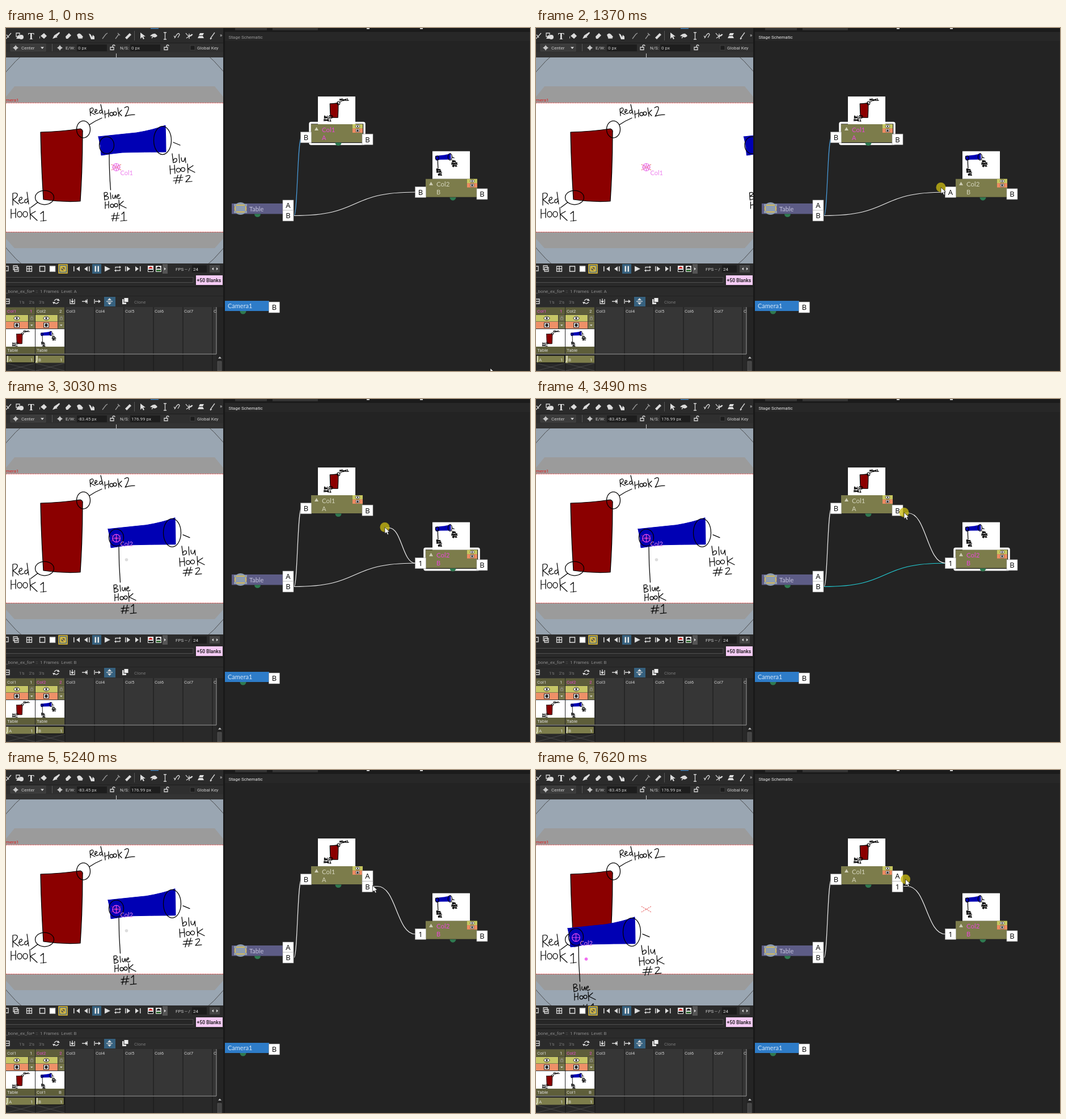
These frames come from a looping animation (924 px wide and 606 px high, 8 s). An HTML page:

```html
<!DOCTYPE html>
<html lang="en">
<head>
<meta charset="utf-8">
<title>Hook linking</title>
<style>
html, body { margin: 0; width: 100%; height: 100%; overflow: hidden; background: #232323; }
svg { display: block; width: 924px; height: 606px; }
text { font-family: Roboto, "Open Sans", sans-serif; white-space: pre; }
.node { font-family: Lato, "Open Sans", sans-serif; }
.port { font-family: "Noto Sans", sans-serif; text-anchor: middle; }
.ink { fill: none; stroke: #000; stroke-linecap: round; stroke-linejoin: round; }
.icon { fill: none; stroke: #d6d6d6; stroke-width: 1.3; }
</style>
</head>
<body>
<svg id="stage" viewBox="0 0 924 606" xmlns="http://www.w3.org/2000/svg"></svg>
<script>
const LOOP = 8000;
const PINK = '#e85ce8';

const rect = (x, y, w, h, fill, more = '') => `<rect x="${x}" y="${y}" width="${w}" height="${h}" fill="${fill}" ${more}/>`;
const path = (d, more = '') => `<path d="${d}" ${more}/>`;
const text = (x, y, s, size, fill, more = '') => `<text x="${x}" y="${y}" font-size="${size}" ${fill && `fill="${fill}"`} ${more}>${s}</text>`;
const oval = (x, y, rx, ry = rx, more = '') => `<ellipse cx="${x}" cy="${y}" rx="${rx}" ry="${ry}" ${more}/>`;
const icon = (d, more = '') => path(d, `class="icon" ${more}`);
const solid = (d, fill = '#dcdcdc') => path(d, `fill="${fill}"`);
const port = (x, y, s, id = '') => rect(x - 9.5, y - 9.5, 19, 19, '#fff', 'stroke="#999" stroke-width=".6"') +
  text(x, y + 4.8, s, 13, '#111', `class="port" ${id && `id="${id}"`}`);
const ball = (x, y) => path(`M${x - 5.5} ${y}a5.5 5.5 0 0 0 11 0z`, 'fill="#2f7a50"');

// Hand-drawn artwork; the line weight is inherited so thumbnails can reuse it.
const redArt = `<g id="redArt" class="ink">
  ${path('M61 184Q98 183 131 178Q136 180 135 184Q135 245 131 306Q100 308 66 303Q62 240 61 184Z', 'fill="#8b0000"')}
  ${oval(136.5, 179, 12, 15)}${oval(68, 299.5, 16.5, 12.5)}
  ${path('M147 171Q157 164 169 159M44 317L56 308')}
  ${path('M149 155L148 143Q154 139 154 144Q154 147 149 149L157 153M156 149Q162 147 160 144Q156 143 157 149Q159 153 163 150M169 145Q164 145 165 150Q168 152 169 148M167 135L171 152')}
  ${path('M174 146L175 159M181 144L181 157M174 153L181 150M197 141L199 156M204 145L199 150L204 155M209 141Q217 136 216 143Q213 152 210 156Q216 153 227 153')}
  ${oval(186, 152, 3)}${oval(192, 151, 3)}
  ${path('M12 313L12 292Q21 290 20 296Q18 301 12 303L22 311M22 305Q30 303 28 299Q23 298 23 306Q25 312 31 308M38 302Q32 302 33 308Q37 311 39 304M37 290L40 311')}
  ${path('M9 320L9 336M17 319L17 335M9 328L17 327M42 317L43 338M52 324L43 329L55 340M61 328L66 324L66 341M61 341L71 340')}
  ${oval(24, 329, 4, 5)}${oval(34, 329, 4, 5)}</g>`;

const blueArt = `<g id="blueArt" class="ink">
  ${path('M163 192Q200 188 230 185Q260 180 281 172Q282 195 282 219Q245 219 205 220Q185 222 168 225Q167 207 163 192Z', 'fill="#0000b4" stroke="#0000b4" stroke-width="1"')}
  ${oval(177.5, 207, 13, 15)}${oval(276, 198.5, 15.5, 25)}
  ${path('M295 202L307 207M182 223Q182 255 184.5 286')}
  ${path('M174 304L173 291Q180 289 179 294L174 297Q183 297 180 302L174 304M184 291L185 302M188 295Q187 302 191 301L193 295L194 301M195 298Q201 297 199 294Q195 294 196 300Q198 303 202 300')}
  ${path('M175 307L175 319M181 306L181 318M175 313L181 312M199 304L200 320M207 306L200 312L212 318M191 327L188 341M197 326L194 341M186 332L200 331M186 337L199 336M204 329L208 325L208 340M202 341L213 340')}
  ${oval(187, 314, 3)}${oval(194, 313, 3)}
  ${path('M293 222L295 238Q303 237 301 231Q297 229 295 234M305 223L306 238M309 229Q309 238 314 235L316 229L317 238')}
  ${path('M289 243L290 258M297 242L298 257M289 250L298 249M320 240L321 256M330 243L321 249L333 255M303 260L299 275M309 259L305 274M296 265L312 264M295 270L311 269M317 262Q326 258 324 264L317 272L328 271')}
  ${oval(304, 251, 3.5)}${oval(312, 250, 3.5)}</g>`;

const thumb = (art, x, y, scale) =>
  `<use href="#${art}" transform="translate(${x} ${y}) scale(${scale})" stroke-width="5.5"/>`;

function toolbar() {
  const locks = [187, 282].map(x => icon(`M${x - 3} 34h6v4.5h-6zM${x + 1} 34v-2q0-2 2-2t2 2`)).join('');
  return rect(0, 0, 383, 606, '#2f2f2f') + rect(0, 0, 383, 26, '#2b2b2b') + rect(0, 26, 383, 1, '#1e1e1e') +
    rect(255, 0, 14, 1.5, '#3a78b0') +
    icon('M0 19L9 9M1 12l4 5') + icon('M18 9h6v6h-6z') + oval(27, 16, 4, 4, 'fill="#ddd"') + solid('M18 19l4-7 4 7z') +
    text(39, 20, 'T', 16, '#eee', 'font-weight="700" style="font-family:Liberation Serif,serif"') +
    solid('M61 14l6-5 5 5-5 5zM60 14q-2 3 0 5z') + solid('M82 19l3-6 9-6 1 2-7 8zM82 20h4z') + icon('M86 13l4 4') +
    solid('M105 15l6-6 4 4-6 6h-3z') + solid('M125 12q4-5 8 0t3 4q-5 4-9 1z') + icon('M127 18h8') +
    solid('M146 10l3 1 3 5 1-4 3 3v5h-6z') + icon('M170 19l6-8 3-2M193 19l6-8M197 9l4 4', 'style="stroke:#999"') +
    solid('M210 17l8-8 3 3-8 8z') + rect(226, 5, 1, 17, '#555') + solid('M237 8v11l3-3 2 4 2-1-2-4h4z') +
    solid('M254 14q8-8 13 0-5 5-8 1z') + icon('M257 18l6-8M278 8h5M278 20h5M280.5 8v12') +
    icon('M297 18l4-6q4-5 5 0l-3 5M296 14l3 3M317 9q7 10 12 2M323 10v9M318 18l10-7') +
    solid('M338 18h11l-2-4h-7zM340 13l2-4h7l-2 4z') + icon('M360 19l8-11M360 20l3-2') + text(377, 16, '»', 9, '#ddd') +
    rect(8, 28, 62, 13, '#3b3b3b', 'stroke="#4a4a4a" stroke-width=".7"') +
    [17, 95].map(x => icon(`M${x - 4.5} 35h9M${x} 30.5v9`) + oval(x, 35, 2.3, 2.3, 'class="icon"')).join('') +
    text(27, 38, 'Center', 8, '#ccc') + solid('M61 33.5h6l-3 3.5z') + rect(81, 28, 1, 13, '#555') +
    text(105, 38, 'E/W:', 8, '#ccc') + rect(125, 29, 53, 12, '#1d1d1d') + text(127, 37.5, '', 8, '#ccc', 'id="ew"') +
    text(201, 38, 'N/S:', 8, '#ccc') + rect(219, 29, 53, 12, '#1d1d1d') + text(221, 37.5, '', 8, '#ccc', 'id="ns"') + locks +
    rect(325, 31, 8, 8, '#1c1c1c', 'stroke="#484848" stroke-width=".7"') + text(337, 38, 'Global Key', 8, '#ccc') +
    rect(0, 43, 383, 9, '#333') + rect(194, 45, 1, 7, '#ccc');
}

function viewer() {
  const spokes = Array.from({ length: 8 }, (_, i) => `<path d="M0 2.5V7" transform="rotate(${i * 45})"/>`).join('');
  const markName = s => text(7, 14, s, 11, '#ee80ee', 'class="node" stroke="none"');
  return `<clipPath id="view"><rect y="52" width="383" height="364"/></clipPath><g clip-path="url(#view)">
    ${rect(0, 52, 383, 364, '#97a3af')}
    ${oval(192, 233, 247, 247, 'fill="#9aa6b2" stroke="#444" stroke-width=".9"')}
    ${path('M-2 124L15 103H368L385 124V370L368 389H15L-2 370Z', 'fill="#9b9b9b"')}
    ${rect(0, 132, 383, 228.5, '#fff')}
    ${path('M0 132.5H383M0 360.5H383', 'stroke="#e01818" stroke-width="1.2" stroke-dasharray="1.6 1.4"')}
    ${text(-4.5, 129.5, 'amera1', 8, '#e02020')}
    <use href="#redArt" stroke-width="1.25"/>
    <use href="#blueArt" id="blue" stroke-width="1.25"/>
    ${path('M186 241L203 251M186 251L203 241', 'stroke="#e03030" stroke-width="1" stroke-dasharray="2 1.5"')}
    <g id="markA" transform="translate(194.5 246)" fill="none" stroke="${PINK}">${oval(0, 0, 6.5)}${oval(0, 0, 2.5)}${spokes}${markName('Col1')}</g>
    <g id="markB" fill="none" stroke="#f04cf0" stroke-width="1.2">${oval(0, 0, 6.8)}${path('M-7 0H7M0-7V7')}${markName('Col2')}
      ${oval(18, 38, 2.8, 2.8, 'id="pivot" stroke="none"')}</g></g>`;
}

function playbar() {
  const boxes = [64, 82].map((x, i) => rect(x - 4.5, 421, 9, 9, i ? '#fff' : 'none', 'stroke="#ddd" stroke-width="1.5"')).join('');
  return rect(0, 416, 383, 21, '#2b2b2b') + boxes +
    rect(93, 418, 15, 15, '#4c6a85', 'stroke="#e8c030" stroke-width="1.5"') + rect(96.5, 421.5, 8, 8, '#555', 'stroke="#f0cc38" stroke-width="2"') +
    icon('M98 423l5 5', 'style="stroke:#f0cc38"') + icon('M-2 421h6v8h-6zM13 420h7v7h-7zM15 423h7v7h-7zM36.5 421h9v9h-9zM36 425.5h10M41 421v9') +
    rect(152, 417, 16, 17, '#36617f') + rect(156.5, 420.5, 2.5, 10, '#e8e8e8') + rect(161.5, 420.5, 2.5, 10, '#e8e8e8') +
    solid('M119 421h1.5v9H119zM130 421v9l-6-4.5zM138 425.5l6-4.5v9zM146 421h1.5v9H146zM174 420.5v10l10-5zM210 421h1.5v9H210zM213 421v9l6-4.5zM228 421v9l6-4.5zM236 421h1.5v9H236z') +
    icon('M193 425v-2.5h8M201 426v2.5h-8') + solid('M200 420l3 2.5-3 2.5zM194 426l-3 2.5 3 2.5z') +
    rect(250, 420, 10, 11, '#eee') + solid('M251 425q4-7 8 0z', '#d02020') + solid('M251 427h8v3h-8z', '#111') +
    rect(264, 420, 10, 11, '#ddd') + solid('M265 425q4-7 8 0z', '#111') + solid('M265 427h8v3h-8z', '#387038') +
    rect(276, 417, 9, 17, '#555') + solid('M279 423v5l3-2.5z') + text(299, 428.5, 'FPS -- /', 8, '#ccc') +
    rect(328, 419, 26, 13, '#1d1d1d') + text(330, 428.5, '24', 8, '#ddd') +
    rect(359, 419, 18, 13, '#454545') + solid('M366 423v5l-3-2.5zM371 423v5l3-2.5z') +
    rect(0, 437, 383, 19, '#2a2a2a') + rect(-2, 440.5, 332, 9, '#262626', 'stroke="#505050" stroke-width="1"') +
    rect(335, 437, 47, 17, '#f6ccf6') + '<clipPath id="blanks"><rect x="335" y="437" width="44" height="18"/></clipPath>' +
    `<g clip-path="url(#blanks)">${text(336.5, 448.5, '+50 Blanks', 8.6, '#111', 'font-weight="500"')}</g>`;
}

function sheet() {
  let out = rect(0, 456, 383, 150, '#2b2b2b') + rect(0, 456, 383, 1.5, '#1b1b1b') +
    text(0, 467.5, '', 8, '#8c8c8c', 'id="sheetTitle"') + rect(0, 473, 383, 1, '#222') +
    icon('M-1 479h7v8h-7zM-1 483h7') + ['1\'s', '2\'s', '3\'s'].map((s, i) => text(23 + i * 17.5, 486.5, s, 8, '#777')).join('') +
    icon('M85 482q4-5 8-1M93 484q-4 5-8 1') + solid('M92 478l3 4h-5zM84 488l-2-4h5z') +
    icon('M113 479v8h8v-8M117 478v6M134 483h8M143 479v8M156 479v8M157 483h8') + solid('M114 482h6l-3 4zM140 480v6l4-3zM163 480v6l4-3z') +
    rect(173, 475, 20, 17, '#36617f') + solid('M179 481h7l-3.5-4zM179 485h7l-3.5 4z') + icon('M177 483h11') +
    rect(205, 479, 7, 9, '#ddd') + rect(208, 476.5, 8, 8, '#eee', 'stroke="#333"') + text(226, 486.5, 'Clone', 8, '#777') +
    rect(0, 493, 371, 83, '#363636') + rect(0, 576, 371, 30, '#292929');
  for (let i = 0; i < 8; i++) {
    const x = i * 52, right = Math.min(x + 52, 371);
    if (i > 1) out += text(x + 2, 502.5, i < 7 ? 'Col' + (i + 1) : 'C', 8, '#ccc');
    out += rect(x - .5, 493, 1, 113, '#181818');
    if (i < 2) out += path(`M${x} 592L${right} 606M${x} 606L${right} 592`, 'stroke="#555" stroke-width=".7"');
  }
  for (const [i, art] of ['redArt', 'blueArt'].entries()) {
    const x = i * 52;
    out += rect(x, 493.5, 51, 13, '#5e5e3a') + text(x + 2, 502.5, 'Col' + (i + 1), 8, '#ddd', `id="head${i}"`) + text(x + 42, 502.5, i + 1, 8, '#ddd', `id="num${i}"`) +
      rect(x, 507, 39, 11.5, '#c6c666') + rect(x + 40, 507, 11, 11.5, '#6b6b45') + rect(x, 519, 39, 12, '#ee9068') + rect(x + 40, 519, 11, 12, '#77774b') +
      oval(x + 19, 512.8, 5, 3, 'fill="#fff" stroke="#222"') + oval(x + 19, 512.8, 1.8, 1.8, 'fill="#222"') +
      rect(x + 14.5, 521, 9, 8, '#fff', 'stroke="#222"') + oval(x + 19, 525, 2.7, 2.7, 'fill="#222"') +
      icon(`M${x + 43.5} 512h4v3.5h-4zM${x + 44.3} 512v-2h2.5v2`, 'style="stroke:#999;stroke-width:.8"') + solid(`M${x + 43} 524h4.5l-2.2 2.5z`) +
      rect(x, 532, 51, 31, '#fff') + thumb(art, i ? 35 : 10, i ? 508 : 515, i ? .16 : .14) +
      rect(x, 563, 51, 12.5, '#5e5e3a') + text(x + 2, 572, 'Table', 8, '#ddd', `id="parent${i}"`) +
      rect(x, 579, 51, 12.5, '#7d7d4b') + rect(x, 579, 4, 12.5, '#b5b57c') + path(`M${x + 3} 579v8l-3 4`, 'stroke="#eee" fill="none"') +
      text(x + 5, 588.5, 'AB'[i], 8, '#ddd') + text(x + 43, 588.5, '1', 8, '#ddd');
  }
  return out + text(93, 572, 'B', 8, '#ddd', 'id="parentHook"') + rect(.5, 578.5, 50, 13, 'none', 'id="cell" stroke="#111" stroke-width="1.3"') +
    rect(0, 575.5, 371, 1.2, '#888') + rect(371, 493, 12, 113, '#242424') + rect(370.5, 493, 1, 83, '#999') +
    solid('M374 584h6l-3-3.5z', '#bbb') + rect(373, 589, 7, 17, '#444', 'stroke="#666" stroke-width=".6"');
}

function column(i) {
  const split = i ? '' : `<g id="twoPorts">${port(637.5, 187.5, 'A')}${port(637.5, 206, 'B', 'hookOut')}</g>`;
  return `<g transform="translate(${i * 202} ${i * 96.7})">
    ${rect(550, 121, 66, 49, '#fff')}${i ? thumb('blueArt', 517.5, 85.3, .23) : thumb('redArt', 559, 97, .2)}
    ${rect(536, 167.5, 96, 37.5, 'none', `id="ring${i}" rx="2" stroke="#fff" stroke-width="3.5"`)}
    ${rect(538, 170, 91, 32, '#7c7c4b')}${ball(586, 202.5)}
    ${rect(611, 170, 18, 7.5, '#c6c660')}${rect(611, 177.5, 18, 7.5, '#ee8c62')}
    ${oval(620, 173.7, 3.6, 2.4, 'fill="#fff" stroke="#222" stroke-width=".8"')}${oval(620, 173.7, 1.2, 1.2, 'fill="#222"')}
    ${rect(617, 178.7, 6, 5, '#eee', 'stroke="#333" stroke-width=".6"')}${oval(620, 181.2, 1.7, 1.7, 'fill="#222"')}
    ${solid('M544 181h7l-3.5-6z', '#d0d0b8')}
    <g id="name${i}">${text(557, 183.5, 'Col' + (i + 1), 11.5, '', 'class="node"')}${text(557, 197.5, 'AB'[i], 11, '', 'class="node"')}</g>
    ${port(529, 193.3, 'B', 'hookIn' + i)}<g id="onePort${i}">${port(637.5, 196.7, 'B')}</g>${split}</g>`;
}

function schematic() {
  return rect(383, 0, 3, 606, '#191919') + rect(386, 0, 538, 606, '#232323') + rect(386, 0, 538, 7, '#1b1b1b') +
    rect(404, 0, 56, 4, '#333') + rect(470, 0, 80, 4, '#333') + rect(636, 0, 5, 2, '#ccc') + rect(730, 0, 5, 2, '#ccc') +
    rect(386, 7, 538, 16, '#272727') + text(392.5, 19, 'Stage Schematic', 8, '#999', 'id="title"') +
    `<g fill="none" stroke-width="1.2">${path('M508 331C514 331 514 193 521 193', 'id="linkA"')}
     ${path('M508 331.5C630 331.5 600 290 722 290', 'id="linkB"')}${path('', 'id="linkC" stroke="#eee"')}</g>` +
    rect(398, 310, 91, 18.5, '#5d5c86') + ball(443.5, 328.5) + oval(413.5, 319, 11, 11, 'fill="#8e9db0"') +
    rect(404, 313, 19, 12, 'none', 'stroke="#e8c040" stroke-width="1.5"') + solid('M402 311h4v4h-4zM421 311h4v4h-4zM402 323h4v4h-4zM421 323h4v4h-4z', '#8e9db0') +
    text(429, 324, 'Table', 11, '#c4c3dc', 'class="node"') + port(497.5, 313.5, 'A') + port(497.5, 331.5, 'B') +
    rect(386, 482, 78, 18, '#2e7cc8') + ball(418, 500) + text(391, 495, 'Camera1', 11, '#d4e6f8', 'class="node"') + port(473, 493.5, 'B') +
    column(0) + column(1);
}

const stage = document.getElementById('stage');
stage.innerHTML = `<defs>${redArt}${blueArt}</defs>` + toolbar() + viewer() + playbar() + sheet() + schematic() +
  `<g id="pointer">${oval(0, 0, 8.5, 8.5, 'id="halo" fill="#c8b812" fill-opacity=".78"')}
   ${path('M0 0V11.5L2.8 9L4.8 13.3L6.8 12.4L5 8.3H8.5Z', 'fill="#fff" stroke="#111" stroke-width=".7"')}</g>`;

const el = {};
stage.querySelectorAll('[id]').forEach(n => el[n.id] = n);
const show = (n, on) => n.setAttribute('visibility', on ? 'visible' : 'hidden');
const label = (n, s) => { if (n.textContent !== s) n.textContent = s; };

// time, x, y
const route = [[0, 854, 601], [70, 852, 598], [450, 527, 345], [820, 714, 284], [1370, 714, 281.5], [2150, 714.5, 277],
  [2400, 715, 276], [2650, 719, 287], [3180, 648, 203], [3490, 649, 200.5], [3970, 649, 202], [4140, 648, 203], [4600, 690, 250],
  [4920, 710, 276], [5180, 646.5, 204], [5560, 646, 204], [5710, 651, 203.5], [5860, 651.5, 199], [6490, 651.5, 198.7],
  [6890, 651.5, 197], [7470, 651.5, 194], [7620, 651.5, 193], [LOOP, 651.5, 193]];

function pointerAt(t) {
  const i = Math.max(1, route.findIndex(p => p[0] >= t));
  const [a, b] = [route[i - 1], route[i]];
  const k = (t - a[0]) / (b[0] - a[0]);
  return [a[1] + (b[1] - a[1]) * k, a[2] + (b[2] - a[2]) * k];
}

// Where the blue drawing sits for each hook choice.
function blueOffset(t) {
  if (t < 1200) return [0, 0];
  if (t < 1990) return [203.5, 0];
  if (t < 6740) return [17, 37.8];
  return t < 7380 ? [-187, 37.8] : [-107, 87.8];
}

function update(t) {
  const [x, y] = pointerAt(t), [dx, dy] = blueOffset(t);
  const second = t >= 2650, linked = t >= 3970;
  const pressed = t >= 900 && t < 2400 || t >= 2650 && t < 3970 || t >= 5860;

  el.pointer.setAttribute('transform', `translate(${x} ${y})`);
  show(el.halo, pressed);
  el.title.setAttribute('fill', t < 900 ? '#999' : '#e8e8e8');
  label(el.ew, second ? '-83.45 px' : '0 px');
  label(el.ns, second ? '176.99 px' : '0 px');
  label(el.sheetTitle, `_bone_ex_for* ::  1 Frames  Level: ${second ? 'B' : 'A'}`);

  el.blue.setAttribute('transform', `translate(${dx} ${dy})`);
  show(el.markA, !second);
  show(el.markB, second);
  el.markB.setAttribute('transform', `translate(${177.5 + dx} ${208.2 + dy})`);
  show(el.pivot, second);
  el.pivot.setAttribute('fill', t < 6740 ? '#ddd' : '#f06cf0');

  for (const i of [0, 1]) {
    const active = second == !!i;
    show(el['ring' + i], active && !linked);
    el['name' + i].setAttribute('fill', active ? '#e848d8' : '#d4d4bc');
    for (const key of ['head', 'num']) el[key + i].setAttribute('fill', active ? '#e848d8' : '#ddd');
  }
  el.cell.setAttribute('x', second ? 52.5 : .5);
  label(el.parent1, linked ? 'Col1' : 'Table');
  show(el.parentHook, linked);

  label(el.hookIn1, t < 1200 ? 'B' : t < 1990 ? 'A' : '1');
  show(el.onePort0, !linked);
  show(el.twoPorts, linked);
  label(el.hookOut, t < 6740 ? 'B' : t < 7380 ? 'A' : '1');

  el.linkA.setAttribute('stroke', second ? '#eee' : '#4a9fe0');
  el.linkB.setAttribute('stroke', t < 3260 ? '#eee' : '#22d0d8');
  show(el.linkB, !linked);
  show(el.linkC, second);
  // A short stub leaves the port before the curve bends.
  const [sx, sy] = linked ? [648, 205.5] : [x, y + 1];
  const bend = (715 - sx) * .5;
  el.linkC.setAttribute('d', `M${sx} ${sy}h7C${sx + 7 + bend} ${sy} ${722 - bend} 290 722 290`);
}

const start = performance.now();
function frame() {
  update((performance.now() - start) % LOOP);
  requestAnimationFrame(frame);
}
frame();
</script>
</body>
</html>
```
